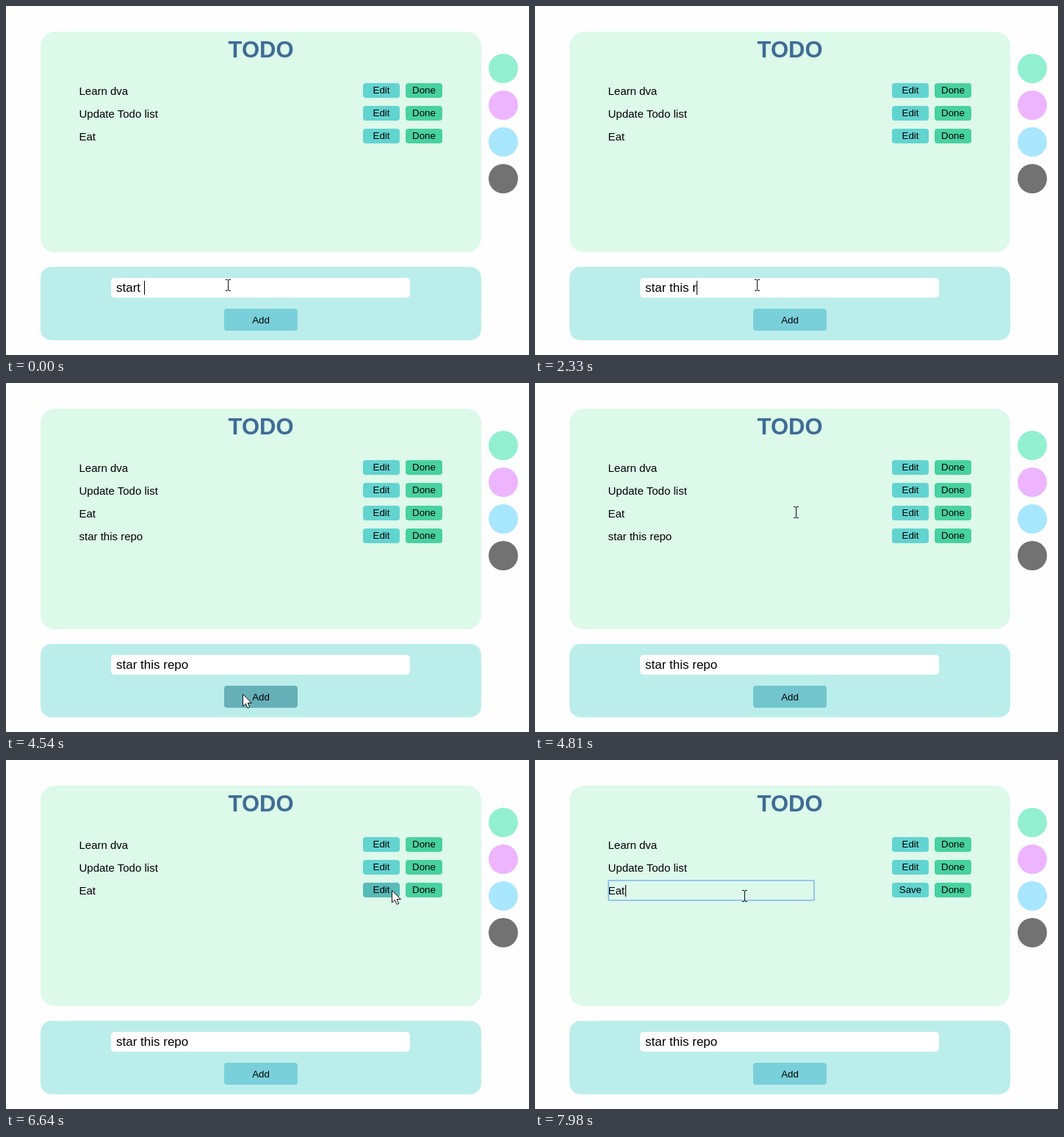
An HTML page that plays this animation: 712 px wide and 475 px high, repeating every 8000 ms.

```html
<!DOCTYPE html>
<html lang="en">
<head>
<meta charset="utf-8">
<title>Todo list</title>
<style>
html, body { margin: 0; width: 100%; height: 100%; overflow: hidden; background: #fefefe; }
svg { display: block; width: 712px; height: 475px; }
text { font-family: "Liberation Sans", Arial, sans-serif; white-space: pre; fill: #000; }
.item { font-size: 15px; }
.label { font-size: 13.333px; text-anchor: middle; }
.field { font-size: 17px; }
.title { font-size: 31px; font-weight: bold; text-anchor: middle; fill: #3e6c95; }
</style>
</head>
<body>
<svg id="stage" viewBox="0 0 712 475"></svg>
<script>
const LOOP = 8000, TICK = 140, FADE = 300;
const ADDED = 4400, REMOVED = 6220, EDITING = 6770, FOCUSED = 7710;
const stage = document.getElementById("stage");
const buttons = [];

const clamp = (v, low, high) => Math.min(high, Math.max(low, v));
const smooth = u => u * u * (3 - 2 * u);

function add(parent, tag, attrs, text) {
  const node = document.createElementNS("http://www.w3.org/2000/svg", tag);
  for (const key in attrs) node.setAttribute(key, attrs[key]);
  if (text !== undefined) node.textContent = text;
  parent.appendChild(node);
  return node;
}
const box = (parent, x, y, width, height, rx, fill) =>
  add(parent, "rect", { x, y, width, height, rx, fill });
const show = (node, on) => node.setAttribute("visibility", on ? "visible" : "hidden");

function button(parent, x, y, w, h, fill, name) {
  box(parent, x, y, w, h, 4, fill);
  const shade = box(parent, x, y, w, h, 4, "#000");
  shade.setAttribute("opacity", 0);
  const label = add(parent, "text", { x: x + w / 2, y: y + h / 2 + (h > 20 ? 5 : 4), class: "label" }, name);
  const contains = p => p.x >= x && p.x <= x + w && p.y >= y && p.y <= y + h;
  buttons.push({ shade, contains });
  return label;
}

// Panels and colour swatches
box(stage, 47, 35, 600, 300, 20, "#dcf9ea");
box(stage, 47, 355, 600, 100, 15, "#bbeeea");
add(stage, "text", { x: 347, y: 70, class: "title" }, "TODO");
["#92f0d0", "#edb5ff", "#a9e6ff", "#727272"].forEach((fill, i) =>
  add(stage, "circle", { cx: 677, cy: 85 + 50 * i, r: 20, fill }));

// Todo rows
const rows = ["Learn dva", "Update Todo list", "Eat", "star this repo"].map((name, i) => {
  const g = add(stage, "g", {}), y = 105 + 31 * i;
  add(g, "text", { x: 99.5, y: y + 16, class: "item" }, name);
  const edit = button(g, 486, y, 50, 20, "#62d4d0", "Edit");
  button(g, 544, y, 50, 20, "#48d1a1", "Done");
  return { g, edit };
});
const editor = add(stage, "g", {});
add(editor, "rect", { x: 100, y: 164, width: 280, height: 27, rx: 1, fill: "none", stroke: "#83b7f2", "stroke-width": 1.6 });
box(editor, 123, 170, 1, 16, 0, "#000");

// Entry form
box(stage, 143, 370, 407, 27, 5, "#fff");
const entry = add(stage, "text", { x: 150, y: 389, class: "field" });
const caret = box(stage, 188, 374, 1, 19, 0, "#000");
const squiggle = add(stage, "path", {
  d: "M214 392.5" + "l2 -2l2 2".repeat(8) + "l2 -2", fill: "none", stroke: "#e8262b"
});
button(stage, 297, 412, 100, 30, "#79d0da", "Add");

// Pointers
const beam = add(stage, "path", {
  d: "M-3 -7.5H0M1 -7.5H4M-3 7.5H0M1 7.5H4M.5 -7V7", fill: "none", stroke: "#111"
});
const arrow = add(stage, "path", {
  d: "M0 0V16.5L3.8 13L6.6 19L9.2 17.9L6.6 12H11.8Z", fill: "#fff", stroke: "#111", "stroke-linejoin": "round"
});

// Erase two letters, then type in bursts at an even pace.
function entryText(t) {
  if (t < 830) return "start ".slice(0, 6 - clamp(Math.ceil((t - 559) / 135), 0, 2));
  const bursts = [[830, 1], [1110, 5], [2330, 2], [2840, 2]];
  const typed = bursts.reduce((sum, [from, n]) => sum + clamp(Math.floor((t - from) / 142) + 1, 0, n), 4);
  return "star this repo".slice(0, typed);
}

// Pointer strokes: start, end, destination
const strokes = [
  [3820, 3980, 322.5, 423.5],
  [4580, 4660, 350, 152],
  [4660, 4800, 355, 176],
  [4800, 4960, 145, 214],
  [5080, 5360, 350, 232],
  [5360, 5560, 557.5, 211.5],
  [6300, 6560, 525.5, 177.5],
  [6780, 7200, 310, 185],
  [7200, 7700, 285, 185]
];
function pointerAt(t) {
  const p = { x: 302, y: 380 };
  for (const [from, to, x, y] of strokes) {
    const u = smooth(clamp((t - from) / (to - from), 0, 1));
    p.x += (x - p.x) * u;
    p.y += (y - p.y) * u;
  }
  return p;
}

// Share of the fade time spent over each button sets its shade.
function shadeButtons(t) {
  const recent = Array.from({ length: 20 }, (_, i) => pointerAt(t - i * FADE / 20));
  for (const { shade, contains } of buttons) {
    const share = recent.filter(contains).length / recent.length;
    shade.setAttribute("opacity", 0.155 * Math.sin(share * Math.PI / 2));
  }
}

function render(t) {
  entry.textContent = entryText(t);
  caret.setAttribute("x", Math.round(150 + entry.getComputedTextLength()));
  show(caret, t < 3390 || (t >= 3960 && t < ADDED));
  show(squiggle, t >= 3960 && t < ADDED);

  rows[3].g.setAttribute("display", t >= ADDED && t < REMOVED ? "inline" : "none");
  rows[2].edit.textContent = t >= EDITING ? "Save" : "Edit";
  show(editor, t >= FOCUSED);

  // The screen refreshes the pointer and hover shades in steps.
  const tick = Math.floor((t - 40) / TICK) * TICK + 40;
  shadeButtons(tick);
  const { x, y } = pointerAt(tick);
  const isArrow = x > 486 || y > 397;
  show(arrow, isArrow);
  show(beam, !isArrow);
  const snap = v => isArrow ? Math.floor(v) + 0.5 : Math.round(v);
  (isArrow ? arrow : beam).setAttribute("transform", `translate(${snap(x)} ${snap(y)})`);
}

const start = performance.now();
function loop() {
  render((performance.now() - start) % LOOP);
  requestAnimationFrame(loop);
}
loop();
</script>
</body>
</html>
```
